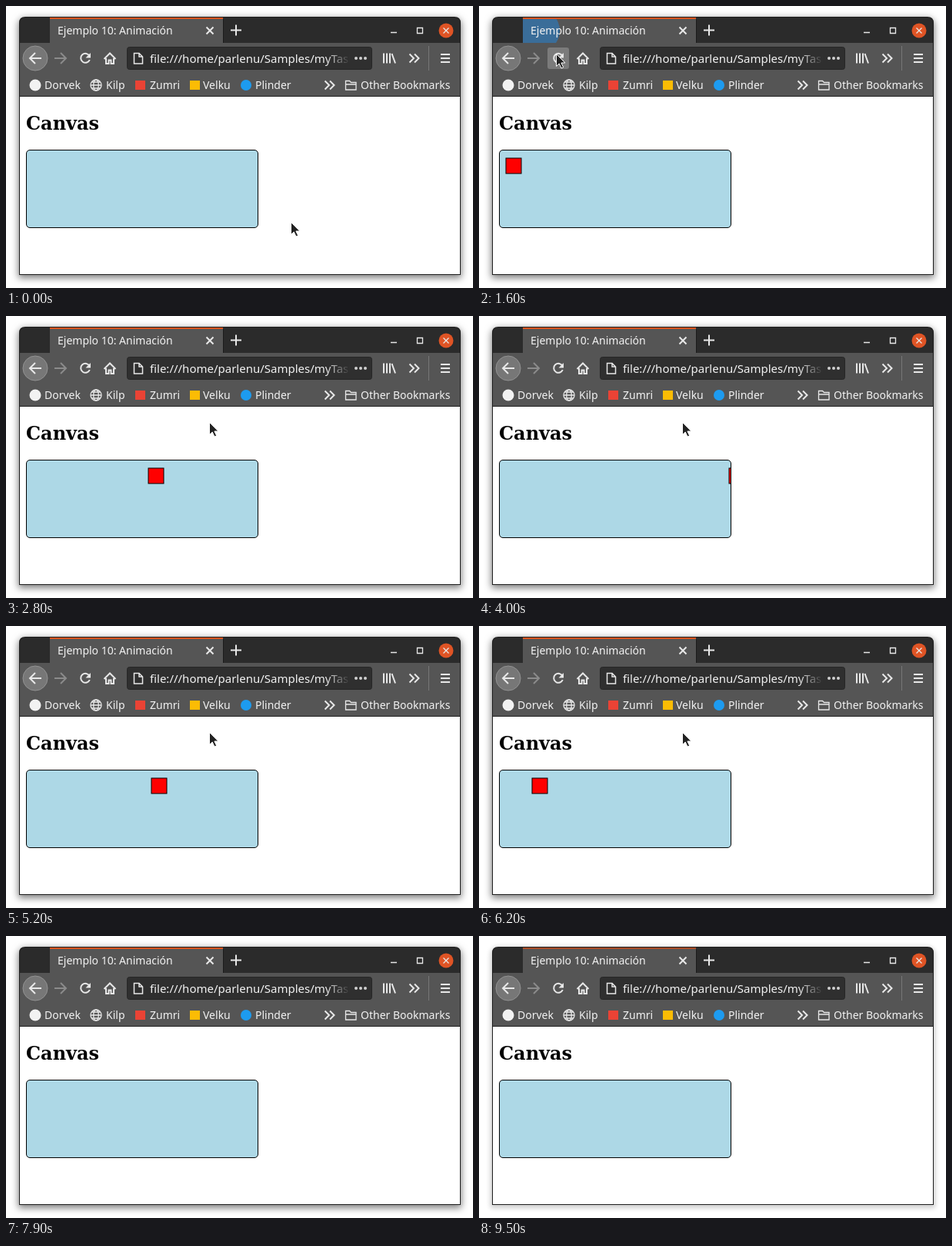
Write an HTML page that moves like this. It is 607 by 367 pixels and loops after 9600 ms.

```html
<!DOCTYPE html>
<html lang="es">
<head>
<meta charset="utf-8">
<title>Animación</title>
<style>
  html, body { margin: 0; width: 100%; height: 100%; overflow: hidden; background: #fff; }
  #shadow { position: absolute; left: 17px; top: 14px; width: 574px; height: 336px; border-radius: 8px 8px 0 0; }
  #shadow { box-shadow: 0 3px 10px 1px rgba(0, 0, 0, .5); }
  #shadow.inactive { box-shadow: 0 2px 6px 2px rgba(0, 0, 0, .2); }
  svg { position: absolute; left: 0; top: 0; display: block; }
  text { font: 14px "Noto Sans", sans-serif; fill: #f2f2f2; white-space: pre; }
  .url { font-size: 15px; }
  .heading { font: bold 24px "DejaVu Serif", serif; fill: #000; }
  .icon { fill: none; stroke: #e8e8e8; stroke-width: 2; }
  .thin { stroke-width: 1.3; }
</style>
</head>
<body>
<div id="shadow"></div>
<svg width="607" height="367" viewBox="0 0 607 367">
  <defs>
    <clipPath id="tabClip"><rect x="57" y="17" width="225" height="31"/></clipPath>
    <clipPath id="stageClip"><rect x="27" y="188" width="300" height="100" rx="4"/></clipPath>
    <linearGradient id="fade">
      <stop offset="0" stop-color="#2f2f2f" stop-opacity="0"/>
      <stop offset="1" stop-color="#2f2f2f"/>
    </linearGradient>
  </defs>

  <!-- Window frame and tab bar -->
  <path d="M17 350V22q0-8 8-8H583q8 0 8 8V350z" fill="#1d1d1d"/>
  <path d="M18 48V22q0-7 7-7H583q7 0 7 7V48z" fill="#2b2b2b"/>
  <rect x="57" y="15" width="225" height="33" fill="#555"/>
  <g clip-path="url(#tabClip)"><circle id="burst" cx="77" cy="32" fill="#3a6d99"/></g>
  <rect id="tabLine" x="57" y="15" width="225" height="2" fill="#d9541f"/>
  <path d="M282.5 17V48" stroke="#1c1c1c"/>
  <text x="67" y="37">Ejemplo 10: Animación</text>
  <path class="icon" stroke-width="1.6" d="M260.5 27.5l9 9m0-9l-9 9M299 24.500v14M292 31.500h14"/>
  <path class="icon thin" d="M500 34.500h8M534.500 28.500h7v7h-7z"/>
  <circle cx="572" cy="32" r="9.500" fill="#df5425"/>
  <path class="icon thin" d="M568.500 28.500l7 7m0-7l-7 7"/>

  <!-- Toolbar -->
  <rect x="18" y="48" width="572" height="69" fill="#555"/>
  <rect id="reloadButton" x="89" y="54" width="28" height="28" rx="3"/>
  <circle cx="38" cy="68" r="16" fill="#777" stroke="#929292"/>
  <path class="icon" d="M46 68H31m7-7l-7 7 7 7"/>
  <path class="icon" style="stroke:#8b8b8b" d="M63 68h15m-7-7l7 7-7 7"/>
  <path class="icon" d="M108.500 65a6 6 0 1 0 .3 5"/>
  <path d="M110 61v6.500h-6.500z" fill="#e8e8e8"/>
  <path class="icon" d="M127.500 69l7.500-7.500 7.500 7.500M130 68v7h3.500v-4.500h3V75h3.500v-7"/>
  <rect id="urlField" x="157.500" y="53.500" width="318" height="29" rx="3" fill="#2f2f2f"/>
  <path class="icon" style="stroke-width:1.500" d="M166.500 61.500h6.500l4.500 4.500v9h-11zM173 61.500V66h4.500"/>
  <svg x="187" y="54" width="260" height="28"><text class="url" x="0" y="20">file:///home/parlenu/Samples/myTask</text></svg>
  <rect x="415" y="55" width="32" height="26" fill="url(#fade)"/>
  <g fill="#d0d0d0"><circle cx="455" cy="68" r="2"/><circle cx="461" cy="68" r="2"/><circle cx="467" cy="68" r="2"/></g>
  <path class="icon" d="M491 61.500v13M495 61.500v13M499 61.500v13M501.500 62l4.500 12.500"/>
  <path class="icon" d="M524.500 62.500l5.500 5.500-5.500 5.500M531 62.500l5.500 5.500-5.500 5.500"/>
  <path d="M549.500 52V84" stroke="#777"/>
  <path class="icon" d="M565 63h12M565 68h12M565 73h12"/>

  <!-- Bookmarks -->
  <circle cx="38" cy="103" r="7.500" fill="#f2f2f2"/>
  <g class="icon thin">
    <circle cx="117" cy="103" r="7"/>
    <ellipse cx="117" cy="103" rx="3.300" ry="7"/>
    <path d="M110 103h14M111.500 99h11M111.500 107h11"/>
  </g>
  <rect x="168" y="97" width="13" height="12" fill="#ea4335"/>
  <rect x="239" y="97" width="13" height="12" fill="#fbbc04"/>
  <circle cx="312" cy="103" r="7" fill="#1d9bf0"/>
  <text x="50" y="108">Dorvek</text>
  <text x="130" y="108">Kilp</text>
  <text x="187" y="108">Zumri</text>
  <text x="256" y="108">Velku</text>
  <text x="324" y="108">Plinder</text>
  <path class="icon" d="M414.500 97.500l5.500 5.500-5.500 5.500M421 97.500l5.500 5.500-5.500 5.500"/>
  <path class="icon thin" d="M441.500 109V97.500h5l2 2h6.500V109zM441.500 102H455"/>
  <text x="461" y="108">Other Bookmarks</text>

  <!-- Page -->
  <rect x="18" y="118" width="572" height="231" fill="#fff"/>
  <text class="heading" x="26" y="161">Canvas</text>
  <rect x="26.500" y="187.500" width="301" height="101" rx="4.500" fill="#add8e6" stroke="#000"/>
  <g clip-path="url(#stageClip)">
    <rect id="square" y="198" width="20" height="20" fill="#f00" stroke="#000"/>
  </g>
  <path id="cursor" d="M.5.5v16l3.700-3.500 2.800 6 2.700-1.200-2.800-5.800h5z" fill="#222" stroke="#fff"/>
</svg>
<script>
  const LOOP = 9600, STEP = 100, TURN = 300;

  // Rows of time, then values, joined by straight lines.
  const travel = [[1600, 8], [2500, 118], [2800, 158], [3500, 238], [4500, 358],
    [5200, 438], [5500, 478], [6200, 558], [6500, 598], [6800, 632]];
  const pointer = [[300, 370, 281], [400, 305, 240], [500, 219, 189], [600, 219, 189],
    [700, 205, 176], [800, 160, 120], [900, 112, 72], [1000, 100, 62], [2000, 100, 62],
    [2500, 258, 136], [2600, 264, 138], [7300, 264, 138], [7400, 250, 128],
    [7600, 162, 68], [7800, 74, 8]];

  const $ = id => document.getElementById(id);
  const set = (id, attributes) => {
    for (const name in attributes) $(id).setAttribute(name, attributes[name]);
  };
  const show = (id, visible) => set(id, { visibility: visible ? "visible" : "hidden" });
  const inside = (x, y, left, top, right, bottom) => x >= left && x < right && y >= top && y < bottom;

  function sample(rows, t) {
    const next = rows.findIndex(row => row[0] > t);
    if (next === 0) return rows[0].slice(1);
    if (next < 0) return rows[rows.length - 1].slice(1);
    const a = rows[next - 1], b = rows[next];
    const k = (t - a[0]) / (b[0] - a[0]);
    return a.slice(1).map((value, i) => Math.round(value + (b[i + 1] - value) * k));
  }

  function draw(t) {
    const [distance] = sample(travel, t);
    const x = distance < TURN ? distance : 2 * TURN - distance;
    show("square", t >= 1600 && t < 6800);
    set("square", { x: 27 + x });

    const [px, py] = sample(pointer, t);
    show("cursor", t < 7900);
    set("cursor", { transform: `translate(${px} ${py})` });

    const pressed = t >= 1400 && t < 1600;
    show("reloadButton", t < 7900 && inside(px, py, 89, 54, 117, 82));
    set("reloadButton", { fill: pressed ? "#949494" : "#7b7b7b" });
    const urlHover = t < 7900 && inside(px, py, 157, 53, 476, 83);
    set("urlField", { stroke: urlHover ? "#6d6d6d" : "#272727" });

    const age = t - 1600;
    show("burst", age >= 0 && age < 400);
    set("burst", { r: 28 + Math.max(0, age) * .6, opacity: 1 - age / 400 });

    const inactive = t >= 9500;
    $("shadow").className = inactive ? "inactive" : "";
    set("tabLine", { fill: inactive ? "#a94c27" : "#d9541f" });
  }

  function frame() {
    const t = performance.now() % LOOP;
    draw(Math.floor(t / STEP) * STEP);
    requestAnimationFrame(frame);
  }
  frame();
</script>
</body>
</html>
```
